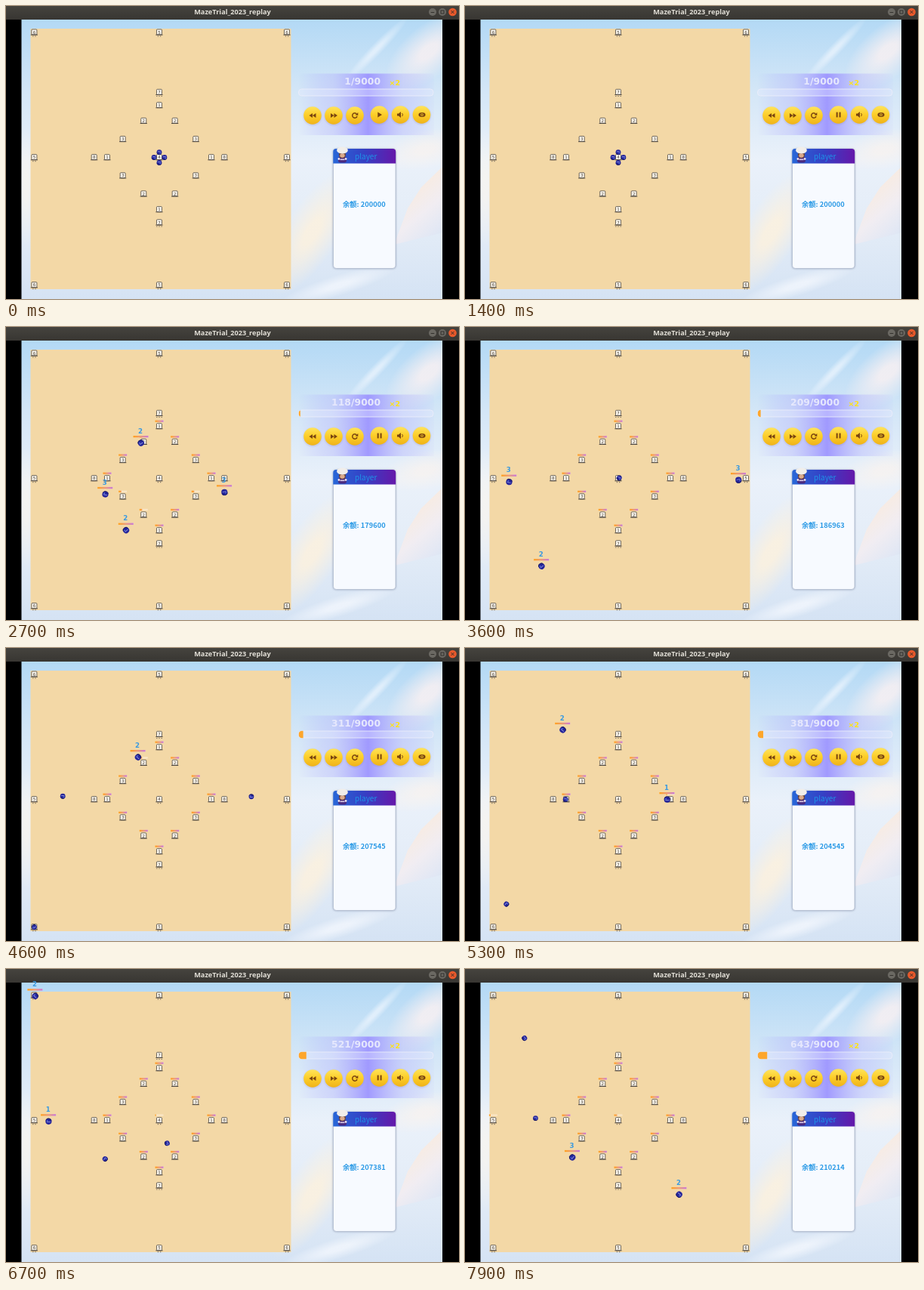
These frames come from a looping animation (600x388 px, 8000 ms). An HTML page with a canvas:

```html
<!DOCTYPE html>
<html lang="zh">
<head>
<meta charset="utf-8">
<title>MazeTrial_2023_replay</title>
<style>
html, body { margin: 0; width: 100%; height: 100%; overflow: hidden; background: #000; }
canvas { display: block; width: 100vw; height: 100vh; }
</style>
</head>
<body>
<canvas id="stage"></canvas>
<script>
const W = 600, H = 388, LOOP = 8000, STEP = 100, START = 1540;
const TICK = 10;       // ms per game tick
const SPEED = 0.083;   // pixels per ms
const SWING = 7;       // sideways drift of a robot that turns round
const METRE = 6.9;
const cv = document.getElementById('stage');
const g = cv.getContext('2d');
const dpr = window.devicePixelRatio || 1;
cv.width = W * dpr;
cv.height = H * dpr;

const CJK = '"Noto Sans CJK SC", "Noto Sans CJK", "Noto Sans", sans-serif';
const WIDE = '"DejaVu Sans", sans-serif';

// ---- game rules ----
const BUY = { 1: 3000, 2: 4400, 3: 5800 };
const SELL = { 1: 6000, 2: 7600, 3: 9200 };
const NEEDS = { 4: [1, 2], 5: [1, 3], 6: [2, 3], 7: [4, 5, 6] };
const clock = [[START, 1], [2700, 118], [4600, 311], [5900, 441], [6700, 521], [7900, 643]];

const place = (dx, dy) => [
  32.2 + METRE * (24.75 + Math.max(-24, dx)),
  29.7 + METRE * (24.75 + Math.max(-24, dy))
];
const mix = (a, b, k) => a + (b - a) * k;
const signs = d => d ? [-1, 1] : [1];

// One quadrant in metres from the centre, with the station type; the rest is mirrored.
const stations = new Map();
for (const [dx, dy, type] of [
  [0, 0, 4], [10, 0, 1], [0, 10, 1], [3, 7, 2], [7, 3.5, 3],
  [12.5, 0, 8], [0, 12.5, 7], [24.5, 0, 5], [0, 24.5, 5], [24.5, 24.5, 6]
]) for (const sx of signs(dx)) for (const sy of signs(dy)) {
  const x = sx * dx, y = sy * dy;
  stations.set(x + ',' + y, { type, pos: place(x, y), buys: [], got: {} });
}

// Start, then the stops: arrival in ms and the station
const routes = [
  [[0, -1], [2450, -3, -7], [3550, 0, 0], [4440, -3, -7], [6720, -24.5, -24.5], [9270, -7, -3.5]],
  [[-1, 0], [2420, -7, 3.5], [3860, -24.5, 0], [5310, -10, 0], [6930, -24.5, 0], [8390, -10, 0]],
  [[1, 0], [2150, 7, 3.5], [3720, 24.5, 0], [5240, 10, 0], [6080, 0, 0], [6950, 3, 7], [9265, 24.5, 24.5]],
  [[0, 1], [2230, -3, 7], [4600, -24.5, 24.5], [7130, -7, 3.5], [9820, -24.5, 24.5]]
];

const deals = [];
// A product loses value the longer it is carried.
const aged = ms => 0.8 + 0.2 * (1 - Math.sqrt(1 - (1 - ms / TICK / 9000) ** 2));

// Each leg: swing from the stop into a lane, then drive straight and arrive on time.
function plan([home, ...stops]) {
  let pos = place(...home), dir = 0, t = START, item = 0;
  return stops.map(([arrive, dx, dy]) => {
    const st = stations.get(dx + ',' + dy), to = st.pos;
    const a = Math.atan2(to[1] - pos[1], to[0] - pos[0]);
    const turn = Math.atan2(Math.sin(a - dir), Math.cos(a - dir));
    const off = -SWING * Math.sin(turn / 2);
    const lane = [pos[0] - off * Math.sin(a), pos[1] + off * Math.cos(a)];
    const run = Math.hypot(to[0] - lane[0], to[1] - lane[1]) / SPEED;
    const leg = { pos, lane, to, dir, turn, item, from: t, leave: Math.max(t, arrive - run), arrive };
    if (st.type < 4) {
      item = st.type;
      st.buys.push(arrive);
      deals.push([arrive, -BUY[item]]);
    } else {
      st.got[item] = arrive;
      deals.push([arrive, Math.floor(SELL[item] * aged(arrive - t))]);
      item = 0;
    }
    dir = Math.atan2(to[1] - lane[1], to[0] - lane[0]);
    pos = to;
    t = arrive;
    return leg;
  });
}
const robots = routes.map(plan);

function tickAt(t) {
  const i = Math.max(1, clock.findIndex(c => c[0] >= t));
  const [a, b] = [clock[i - 1], clock[i]];
  return Math.floor(mix(a[1], b[1], Math.max(0, t - a[0]) / (b[0] - a[0])) + 1e-6);
}

// A finished product waits in the slot; the next one may finish only when the slot is free.
function progress(t, buys) {
  let s = START + 500;
  if (t < s) return (t - START) / 500;
  for (const b of buys) {
    if (t < b) break;
    if (b >= s + 500) s = b;
    else if (t >= s + 500) s += 500;
  }
  return Math.min(1, (t - s) / 500);
}

// ---- drawing helpers ----
function grad(x0, y0, x1, y1, ...stops) {
  const gr = g.createLinearGradient(x0, y0, x1, y1);
  stops.forEach((c, i) => gr.addColorStop(i / (stops.length - 1), c));
  return gr;
}
function rect(x, y, w, h, fill) { g.fillStyle = fill; g.fillRect(x, y, w, h); }
function round(x, y, w, h, r, fill, line) {
  g.beginPath();
  g.roundRect(x, y, w, h, r);
  if (fill) { g.fillStyle = fill; g.fill(); }
  if (line) { g.strokeStyle = line; g.stroke(); }
}
function oval(x, y, rx, ry, fill) {
  g.beginPath();
  g.ellipse(x, y, rx, ry, 0, 0, 7);
  g.fillStyle = fill;
  g.fill();
}
const disc = (x, y, r, fill) => oval(x, y, r, r, fill);
function poly(fill, ...p) {
  g.beginPath();
  for (let i = 0; i < p.length; i += 2) g.lineTo(p[i], p[i + 1]);
  g.fillStyle = fill;
  g.fill();
}
function arc(x, y, r, a, b, line) {
  g.beginPath();
  g.arc(x, y, r, a, b);
  g.strokeStyle = line;
  g.stroke();
}
function text(s, x, y, font, fill, align = 'left') {
  g.font = font;
  g.fillStyle = fill;
  g.textAlign = align;
  g.fillText(s, x, y);
}
function glow(x, y, rx, ry, turn, rgb, alpha) {
  g.save();
  g.translate(x, y);
  g.rotate(turn);
  g.scale(rx, ry);
  const gr = g.createRadialGradient(0, 0, 0.2, 0, 0, 1);
  gr.addColorStop(0, `rgba(${rgb},${alpha})`);
  gr.addColorStop(1, `rgba(${rgb},0)`);
  disc(0, 0, 1, gr);
  g.restore();
}

// ---- scene ----
function backdrop() {
  rect(0, 0, W, H, '#000');
  g.save();
  g.beginPath();
  g.rect(20.5, 18, 557.5, 370);
  g.clip();
  rect(20, 18, 559, 370, grad(0, 18, 0, 388, '#b3d9f5', '#d3e6f7', '#eaf1fa', '#e3ecf7', '#d5e3f4'));
  glow(560, 60, 70, 34, -0.7, '248,240,242', 0.85);
  glow(490, 58, 60, 8, -0.8, '245,249,255', 0.6);
  glow(405, 300, 95, 36, -1, '252,241,222', 0.85);
  glow(555, 190, 60, 26, -0.2, '250,243,238', 0.7);
  glow(440, 370, 80, 14, -0.3, '246,249,254', 0.7);
  poly(grad(520, 250, 570, 310, '#f9ebdf', '#f1edf2', '#dde6f5'), 579, 212, 550, 240, 532, 268, 514, 316, 579, 300);
  glow(27, 240, 16, 80, 0, '252,246,236', 0.6);
  g.restore();
}

function titleBar() {
  rect(0, 0, W, 18, grad(0, 0, 0, 18, '#45433e', '#383632'));
  text('MazeTrial_2023_replay', 300, 11, 'bold 9.2px "Open Sans", sans-serif', '#e2dfd7', 'center');
  disc(565, 8, 5, '#6b6963');
  disc(578, 8, 5, '#6b6963');
  disc(591.5, 8, 5.3, '#e9592b');
  g.lineWidth = 0.9;
  g.strokeStyle = '#2d2b28';
  g.strokeRect(576, 6, 4, 4);
  g.beginPath();
  g.moveTo(562.7, 8.5); g.lineTo(567.3, 8.5);
  g.moveTo(589.5, 6); g.lineTo(593.5, 10);
  g.moveTo(593.5, 6); g.lineTo(589.5, 10);
  g.stroke();
}

function bar(x, y, w, h, part) {
  rect(x - w / 2, y, w, h, 'rgba(255,240,220,.6)');
  rect(x - w / 2, y, w * part, h, grad(x - w / 2, 0, x + w / 2, 0, '#ffa21c', '#ee9a78', '#c878d8'));
}

function station({ type, pos: [x, y], buys, got }, t) {
  const ink = '#4a443e', needs = NEEDS[type] || [];
  g.lineWidth = 0.8;
  round(x - 3.5, y - 3.9, 7, 7, 1, '#fbf6ec', ink);
  rect(x - 4.6, y + 2.8, 9.2, 1, ink);
  text(type, x, y + 1.8, '5.5px ' + WIDE, ink, 'center');
  needs.forEach((n, i) =>
    rect(x - 0.6 + (i - (needs.length - 1) / 2) * 3.2, y + 4.7, 1.3, 1, '#6a6159'));
  if (type < 4 && t >= START) bar(x, y - 8, 11, 2.4, progress(t, buys));
  const ready = needs.length ? Math.max(...needs.map(n => got[n] || Infinity)) : Infinity;
  if (t >= ready) bar(x, y - 8, 11, 2.2, (t - ready) / 5000);
}

function robot(legs, t) {
  const leg = legs.find(l => t < l.arrive);
  const { pos, lane, to, item } = leg;
  const turning = t < leg.leave;
  const k = turning ? Math.max(0, t - leg.from) / (leg.leave - leg.from)
                    : (t - leg.leave) / (leg.arrive - leg.leave);
  const [a, b] = turning ? [pos, lane] : [lane, to];
  const x = mix(a[0], b[0], k), y = mix(a[1], b[1], k);
  const r = item ? 4.1 : 3.4;
  g.save();
  g.translate(x, y);
  g.rotate(leg.dir + leg.turn * (turning ? k : 1));
  disc(0, 0, r, '#25259a');
  g.lineWidth = 0.8;
  arc(0, 0, r - 0.3, 0.4, 2.8, '#181850');
  rect(-r * 0.6, -1.2, r * 1.2, 0.9, '#8f98df');
  disc(r * 0.4, 1, 0.9, '#5a70dc');
  g.restore();
  if (item) {
    bar(x - 0.3, y - 9.7, 20, 2.4, 1);
    text(item, x - 0.8, y - 12.8, 'bold 8.6px ' + WIDE, '#3a9ae0', 'center');
  }
}

function field(t) {
  rect(32.5, 30, 345, 345, '#f3d8a6');
  stations.forEach(s => station(s, t));
  robots.forEach(r => robot(r, t));
}

function controls(t) {
  const ink = '#7a4510';
  for (let i = 0; i < 6; i++) {
    const x = 406 + 28 * i + (i > 2 ? 4.5 : 0), y = i > 2 ? 144 : 145;
    glow(x, y + 1, 14, 14, 0, '110,100,150', 0.6);
    disc(x, y, 11.8, grad(0, y - 12, 0, y + 12, '#ffe45c', '#fccd28', '#efb21a'));
  }
  for (const x of [401.5, 406]) poly(ink, x + 4.5, 142, x + 4.5, 148, x, 145);
  for (const x of [430, 434.5]) poly(ink, x, 142, x, 148, x + 4.5, 145);
  g.lineWidth = 1.5;
  arc(462, 145, 3.2, 0.3, 5.5, ink);
  poly(ink, 466.3, 141, 466.3, 145, 462.6, 144.2);
  if (t < STEP) poly(ink, 492.3, 140.5, 492.3, 147.5, 498, 144);
  else for (const x of [491.7, 495.6]) rect(x, 140.6, 2, 6.8, ink);
  poly(ink, 518, 142.5, 520, 142.5, 523, 140, 523, 148, 520, 145.5, 518, 145.5);
  g.lineWidth = 1;
  arc(522.8, 144, 2.6, -0.9, 0.9, ink);
  oval(551, 144, 4.6, 3, ink);
  disc(551, 144, 1.8, '#fbd030');
  disc(551, 144, 0.9, ink);
}

function panel(t) {
  const edge = 'rgba(170,165,255,0)', mid = 'rgba(180,180,252,.42)';
  rect(387, 89.5, 180, 81.5, grad(387, 0, 572, 0, edge, mid, 'rgba(157,149,255,.95)', mid, edge));
  const tick = tickAt(t);
  text(tick + '/9000', 496, 104.3, 'bold 12.4px ' + WIDE, '#e6e8fd', 'right');
  text('×2', 507.5, 105, 'bold 9.5px ' + WIDE, '#ffe312');
  g.lineWidth = 1;
  round(387.5, 110, 178.5, 9, 4, 'rgba(235,238,255,.3)', 'rgba(236,238,250,.85)');
  if (tick > 1) {
    g.save();
    g.beginPath();
    g.rect(387.5, 109, 178 * tick / 9000, 11);
    g.clip();
    round(387.5, 109.7, 60, 9.6, 4.5, '#fda62c');
    g.restore();
  }
  controls(t);
}

function avatar(x, y) {
  round(x - 5.5, y + 4, 11, 8, 3, '#4a2c82');
  disc(x, y + 1.5, 4.6, '#6a4438');
  oval(x, y + 2.5, 3.2, 2.8, '#dcab8c');
  oval(x, y - 4.5, 7.4, 4.6, '#f1eeea');
  rect(x - 3, y + 7, 6, 1.6, '#dccbe8');
  for (const s of [-1, 1]) disc(x + s * 4.6, y + 7, 1.4, '#e9e2ee');
}

function card(t) {
  g.save();
  g.shadowColor = 'rgba(70,85,120,.65)';
  g.shadowBlur = 3 * dpr;
  round(433.5, 189.5, 82.5, 158, 4, '#f7faff');
  g.restore();
  g.lineWidth = 0.7;
  round(433.5, 189.5, 82.5, 158, 4, null, '#aeb9cd');
  round(433.3, 189, 82.9, 19.5, [4, 4, 0, 0], grad(433, 0, 516, 0, '#2867d8', '#3540c4', '#6518aa'));
  avatar(445.5, 195.5);
  text('player', 462, 203.3, '500 10px ' + CJK, '#1f93e8');
  const cash = deals.reduce((sum, [at, gain]) => at <= t ? sum + gain : sum, 200000);
  text('余额: ' + cash, 446, 266, 'bold 9.3px ' + CJK, '#2b9ae6');
}

function draw(now) {
  const t = Math.floor(now % LOOP / STEP) * STEP;
  g.setTransform(dpr, 0, 0, dpr, 0, 0);
  backdrop();
  titleBar();
  field(t);
  panel(t);
  card(t);
  requestAnimationFrame(draw);
}
requestAnimationFrame(draw);
</script>
</body>
</html>
```
